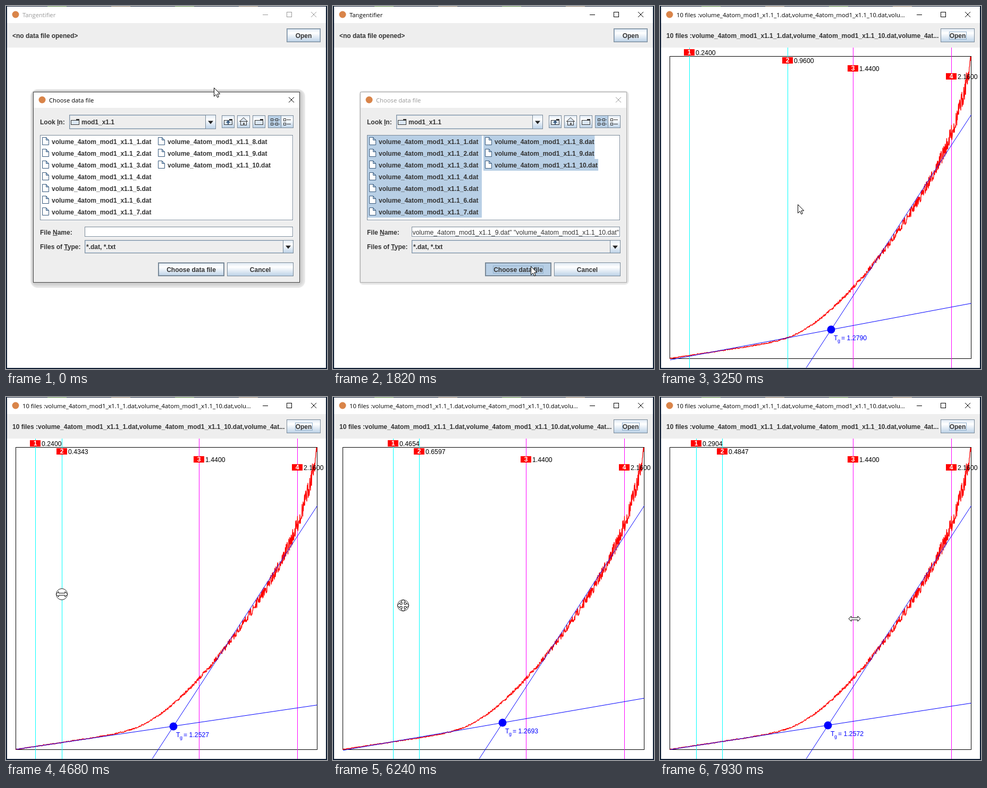
Recreate the animation shown at these times as an HTML page with a canvas. Size 604 by 681 pixels, loop 8000 ms.

```html
<!DOCTYPE html>
<html lang="en">
<head>
<meta charset="utf-8">
<title>Curve fitting</title>
<style>
html, body { margin: 0; width: 100%; height: 100%; overflow: hidden; background: #0b1a30; }
canvas { display: block; }
</style>
</head>
<body>
<canvas id="stage" width="604" height="681"></canvas>
<script>
const g = document.getElementById('stage').getContext('2d');
const LOOP = 8000, STEP = 130;
const BOLD = 'bold 12px "Liberation Sans", Arial, sans-serif';
const PLAIN = '12.3px "Liberation Sans", Arial, sans-serif';
const SMALL = '9px "Liberation Sans", Arial, sans-serif';
const TITLE = '11.25px "Open Sans", "Noto Sans", sans-serif';
const EDGE = '#7a8a99', INK = '#333', PANEL = '#eee', SELECT = '#b8cfe5', STEEL = '#36587c';
const APP = 'Tangentifier';
const fileName = i => `volume_4atom_mod1_x1.1_${i}.dat`;

// ---- motion ----
const mix = (a, b, p) => a + (b - a) * p;
function ease(t, from, to) {
  const p = Math.min(1, Math.max(0, (t - from) / (to - from)));
  return p * p * (3 - 2 * p);
}

// pointer journeys: departure, arrival, x, y
const ROUTE = [
  [130, 390, 200, 250], [520, 780, 400, 296], [910, 1560, 372, 488], [2340, 3250, 259, 372],
  [3250, 3510, 240, 372], [3900, 4680, 105, 370], [4680, 4940, 71, 398],
  [7380, 7540, 370, 409], [7670, 7930, 366, 416]
];
const SCALE = 256.8;
const toX = v => v * SCALE - 6.49;
const steepY = x => 205 + (585 - x) * 1.529;

// both left markers are pulled right together, then part of the way back
const shift = t => .2875 * ease(t, 5330, 6630) - .2371 * ease(t, 6700, 7368);

function fitAt(t) {
  const narrow = ease(t, 3900, 4680), d = shift(t);
  return {
    marks: [.24 + d, mix(.96, .4343, narrow) + d, 1.44, 2.16],
    tg: mix(1.279, 1.2527, narrow) + .0944 * d - .0917 * d * d
  };
}

function pointerAt(t) {
  let x = 391, y = 153;
  for (const [from, to, px, py] of ROUTE) {
    const p = ease(t, from, to);
    x = mix(x, px, p);
    y = mix(y, py, p);
  }
  if (t < 7380) {
    const d = shift(t + 45);
    x += d * SCALE;
    y -= 130 * d * d;
  }
  return [Math.round(x), Math.round(y)];
}

// straight start, soft bend into a parabola, steep tail
function trend(x) {
  const w = 22 * Math.log(1 + Math.exp((x - 250) / 22));
  return 661 - .15 * (x - 19) - .5 * w - .0019 * w * w - 95 * Math.exp((x - 585) / 27);
}
function noisyCurve() {
  const path = new Path2D();
  let seed = 7;
  for (let x = 19; x <= 585; x += .5) {
    seed = seed * 16807 % 2147483647;
    const spread = 1 + 19 * ((x - 19) / 566) ** 4;
    path.lineTo(x, Math.max(95, trend(x) + (seed / 2147483647 * 2 - 1) * spread));
  }
  return path;
}
const CURVE = noisyCurve();

// ---- drawing helpers ----
function rect(x, y, w, h, fill) {
  g.fillStyle = fill;
  g.fillRect(x, y, w, h);
}
function frame(x, y, w, h, color = EDGE) {
  g.lineWidth = 1;
  g.strokeStyle = color;
  g.strokeRect(x + .5, y + .5, w - 1, h - 1);
}
function line(x1, y1, x2, y2, color) {
  g.strokeStyle = color;
  g.lineWidth = 1;
  g.beginPath();
  g.moveTo(x1, y1);
  g.lineTo(x2, y2);
  g.stroke();
}
function text(str, x, y, font = BOLD, color = INK, align = 'left') {
  g.font = font;
  g.fillStyle = color;
  g.textAlign = align;
  g.fillText(str, x, y);
}
function poly(points, fill, stroke) {
  g.beginPath();
  points.forEach(([x, y]) => g.lineTo(x, y));
  g.closePath();
  g.fillStyle = fill;
  g.fill();
  if (stroke) { g.strokeStyle = stroke; g.lineWidth = 1; g.stroke(); }
}
function disc(x, y, r, fill) {
  g.fillStyle = fill;
  g.beginPath();
  g.arc(x, y, r, 0, 7);
  g.fill();
}

// ---- widgets ----
function glossy(x, y, w, h) {
  const shade = g.createLinearGradient(0, y, 0, y + h);
  ['#dde8f3', '#fff', '#dde8f3', SELECT].forEach((c, i) => shade.addColorStop(i / 3, c));
  rect(x, y, w, h, shade);
  frame(x, y, w, h);
}
function button(x, y, w, h, label, { inner, pressed, focus } = {}) {
  glossy(x, y, w, h);
  if (pressed) rect(x + 1, y + 1, w - 2, h - 2, SELECT);
  if (inner) frame(x + 1, y + 1, w - 2, h - 2, inner);
  text(label, x + w / 2, y + h / 2 + 5, BOLD, INK, 'center');
  if (focus) {
    const fw = Math.round(g.measureText(label).width) + 2;
    frame(Math.round(x + (w - fw) / 2), y + 6, fw, h - 11, '#8faecb');
  }
}
function label(str, key, x, y) {
  text(str, x, y);
  const at = str.indexOf(key);
  rect(x + g.measureText(str.slice(0, at)).width, y + 1, g.measureText(key).width, 1, INK);
}
function combo(x, y, w, h) {
  rect(x, y, w, h, PANEL);
  frame(x, y, w, h);
  frame(x + 1, y + 1, w - 2, h - 2, '#c5d5e5');
  glossy(x + w - 20, y, 20, h);
  const cx = x + w - 10, cy = y + h / 2;
  poly([[cx - 5, cy - 2], [cx + 5, cy - 2], [cx, cy + 4]], '#222');
}
function cross(x, y, color) {
  line(x, y, x + 10, y + 10, color);
  line(x + 10, y, x, y + 10, color);
}
function folder(x, y) {
  rect(x + 10, y, 6, 3, INK);
  rect(x, y + 2, 16, 9, '#dce8f4');
  frame(x, y + 2, 16, 9, INK);
}
function sheet(x, y) {
  poly([[x + .5, y + .5], [x + 7.5, y + .5], [x + 12.5, y + 5.5], [x + 12.5, y + 14.5],
    [x + .5, y + 14.5]], '#fff', STEEL);
  poly([[x + 7.5, y + .5], [x + 7.5, y + 5.5], [x + 12.5, y + 5.5]], SELECT, STEEL);
}

// ---- scene ----
function drawWindow(t, plotted) {
  rect(0, 0, 604, 681, '#0b1a30');
  for (let i = 0; i < 4; i++) rect(78 + i * 120, 0, 36, 1, i % 2 ? '#765' : '#473');
  rect(2, 1, 600, 678, '#fff');
  rect(2, 32, 600, 46, PANEL);
  disc(18, 16, 6.5, '#d98449');
  const color = t < 1820 ? '#999' : '#000';
  const list = `10 files :${fileName(1)},${fileName(10)},`;
  text(plotted ? list + 'volu...' : APP, 31, 21, TITLE, color);
  line(483, 16.5, 493, 16.5, color);
  frame(528, 11, 10, 10, color);
  cross(574, 11, color);
  text(plotted ? list + 'volume_4at...' : '<no data file opened>', 12, 60);
  button(528, 42, 64, 26, 'Open', plotted ? { focus: true } : { inner: '#a3b8cc' });
}

function drawToolbar() {
  for (let i = 0; i < 5; i++) glossy(i < 4 ? 406 + i * 29 : 517, 205, 24, 24);
  rect(494, 206, 23, 22, SELECT);
  folder(410, 212);
  poly([[418, 214], [422, 219], [414, 219]], STEEL);
  rect(417, 218, 2, 4, STEEL);
  poly([[439.5, 216.5], [447, 209.5], [454.5, 216.5]], '#dce8f4', INK);
  frame(441, 216, 12, 8, INK);
  rect(446, 219, 3, 5, '#666');
  folder(468, 212);
  for (const y of [211, 219]) {
    for (const x of [498, 507, 522]) {
      frame(x, y, 5, 5, INK);
      rect(x + 6, y + 2, x > 510 ? 8 : 2, 1, INK);
    }
  }
}

function drawFiles(t) {
  rect(64, 242, 477, 161, '#fff');
  frame(64, 242, 476, 160);
  for (let i = 0; i < 10; i++) {
    const second = i > 6, x = second ? 286 : 68, y = 243 + i % 7 * 22;
    const name = fileName(i + 1);
    g.font = BOLD;
    const width = second ? g.measureText(name).width + 22 : 215;
    if (t >= 910 || (t >= 390 && i === 0)) rect(x - 3, y, width, 22, SELECT);
    sheet(x, y + 3);
    text(name, x + 18, y + 16);
  }
}

function drawDialog(t) {
  const active = t < 1820, size = active ? 10 : 4;
  for (let i = size; i > 0; i--) {
    const v = 236 - 4 * (size - i);
    g.fillStyle = `rgb(${v},${v},${v})`;
    g.beginPath();
    g.roundRect(51 - i / 2, 161 - i / 2, 502 + i * 1.5, 358 + i * 1.5, i + 4);
    g.fill();
  }
  rect(51, 161, 502, 358, '#fff');
  rect(52, 191, 500, 327, PANEL);
  frame(51, 161, 502, 358, active ? '#444' : '#aaa');
  disc(68, 176, 6.5, '#d98449');
  const color = active ? '#000' : '#999';
  text('Choose data file', 81, 181, TITLE, color);
  cross(532, 171, color);

  label('Look In:', 'I', 64, 222);
  combo(119, 204, 276, 27);
  folder(122, 212);
  text('mod1_x1.1', 142, 222);
  drawToolbar();
  drawFiles(t);

  label('File Name:', 'N', 64, 429);
  rect(148, 414, 393, 20, '#fff');
  frame(148, 414, 392, 19);
  g.save();
  g.beginPath();
  g.rect(150, 415, 389, 17);
  g.clip();
  if (t >= 1040) text(`"${fileName(9)}" "${fileName(10)}"`, 538, 429, PLAIN, INK, 'right');
  else if (t >= 390) text(fileName(1), 151, 429, PLAIN);
  g.restore();
  label('Files of Type:', 'T', 64, 456);
  combo(148, 439, 393, 25);
  text('*.dat, *.txt', 151, 456);
  const pressed = t >= 1690;
  button(286, 481, 125, 26, 'Choose data file', { inner: EDGE, pressed, focus: pressed });
  button(416, 481, 125, 26, 'Cancel');
}

function drawPlot(t) {
  const { marks, tg } = fitAt(t);
  frame(18, 94, 568, 568, '#000');
  marks.forEach((v, i) => rect(Math.floor(toX(v)), 78, 1, 601, i < 2 ? '#0ff' : '#f0f'));
  g.strokeStyle = '#f00';
  g.lineWidth = 1.3;
  g.lineJoin = 'bevel';
  g.stroke(CURVE);
  g.lineJoin = 'miter';

  const x = toX(tg), y = steepY(x);
  const left = 661 + (tg - 1.2527) * 110, slope = (y - left) / (x - 19);
  line(19, left, 585.5, left + slope * 566.5, '#00f');
  line(275.3, 678.5, 585.5, steepY(585.5), '#00f');
  const cx = Math.round(x), cy = Math.round(y);
  disc(cx, cy, 7.5, '#00f');
  text('T', cx + 5, cy + 20, PLAIN, '#00f');
  text('g', cx + 12, cy + 24, SMALL, '#00f');
  text('= ' + tg.toFixed(4), cx + 19, cy + 20, PLAIN, '#00f');

  marks.forEach((v, i) => {
    const mx = Math.floor(toX(v)), my = 87 + i * 15;
    rect(mx - 10, my - 6, 20, 12, '#f00');
    text(i + 1, mx, my + 4, BOLD, '#fff', 'center');
    text(v.toFixed(4), mx + 12, my + 5, PLAIN, '#000');
  });
}

const ARROW = [[.5, .5], [.5, 16.5], [4.3, 13], [6.8, 18.5], [9.3, 17.4], [6.9, 12], [11.8, 12]];
const ARM = [[2, -2], [6, -2], [6, -5], [11, 0], [6, 5], [6, 2]];
function arms(n) {
  const points = [];
  for (let k = 0; k < n; k++) {
    const c = Math.cos(k * 2 * Math.PI / n), s = Math.sin(k * 2 * Math.PI / n);
    for (const [x, y] of ARM) points.push([x * c - y * s, x * s + y * c]);
  }
  return points;
}
const SIDEWAYS = arms(2), FOURWAY = arms(4);

function drawPointer(t) {
  const within = (from, to) => t >= from && t < to;
  g.save();
  g.translate(...pointerAt(t));
  if (within(3770, 4810) || within(5330, 7410)) {
    disc(0, 0, 10.5, '#fff');
    g.strokeStyle = '#222';
    g.lineWidth = 1;
    g.stroke();
  }
  const shape = within(4940, 7410) ? FOURWAY
    : within(3380, 4940) || t >= 7930 ? SIDEWAYS : ARROW;
  poly(shape, '#fff', '#000');
  g.restore();
}

function draw(now) {
  const t = Math.floor(now % LOOP / STEP) * STEP;
  const plotted = t >= 2470;
  drawWindow(t, plotted);
  if (t < 2080) {
    g.globalAlpha = t < 1950 ? 1 : .4;
    drawDialog(t);
    g.globalAlpha = 1;
  }
  if (plotted) drawPlot(t);
  drawPointer(t);
}

const start = performance.now();
function tick() {
  draw(performance.now() - start);
  requestAnimationFrame(tick);
}
tick();
</script>
</body>
</html>
```
